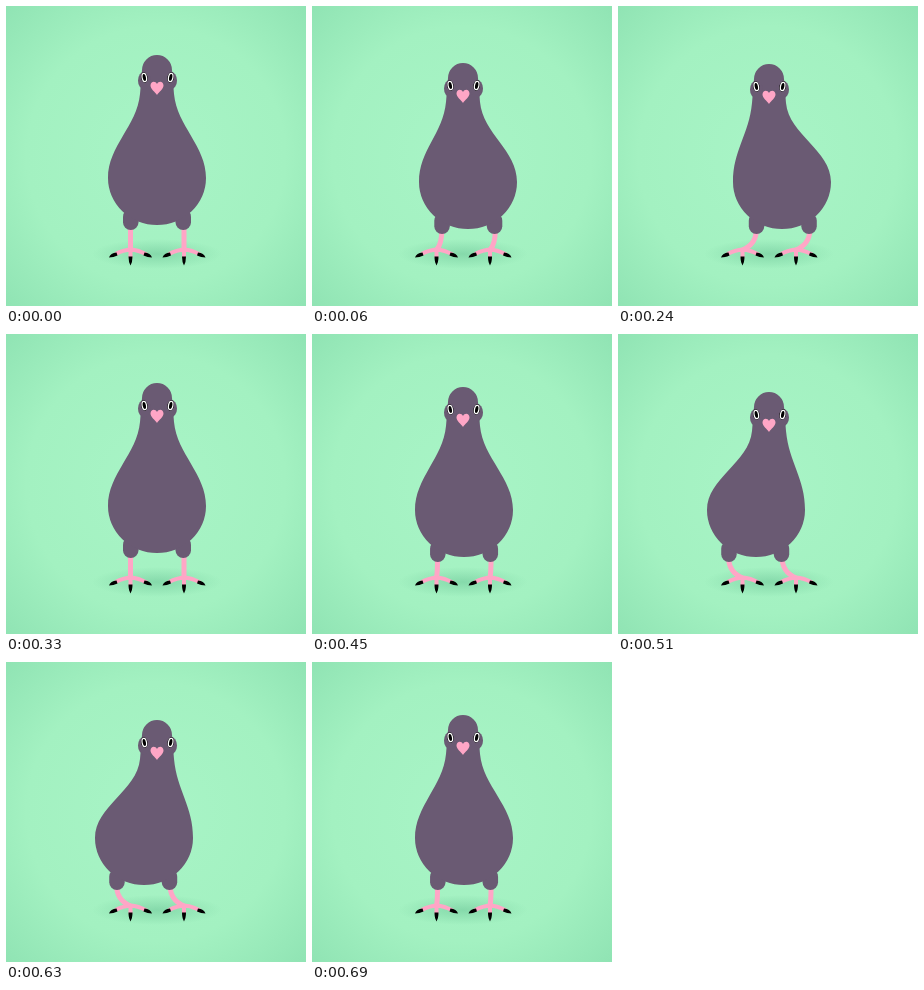
An HTML page for the animation above (0.81 s loop, 300 by 300 pixels).

```html
<!DOCTYPE html>
<html lang="en">
<head>
<meta charset="utf-8">
<title>Swaying pigeon</title>
<style>
  html, body { margin: 0; width: 100%; height: 100%; overflow: hidden; background: #a0efc0; }
  svg { display: block; width: 100vw; height: 100vh; }
  .plumage { fill: #6a5a73; }
  .pink { fill: none; stroke: #ffa6c6; stroke-width: 5; }
</style>
</head>
<body>
<svg viewBox="0 0 300 300">
  <defs>
    <radialGradient id="backdrop" r=".72">
      <stop offset="0" stop-color="#a8f4c6"/>
      <stop offset=".6" stop-color="#a3f1c1"/>
      <stop offset="1" stop-color="#8fe3b3"/>
    </radialGradient>
    <radialGradient id="shade">
      <stop offset="0" stop-color="#71c99b" stop-opacity=".6"/>
      <stop offset="1" stop-color="#71c99b" stop-opacity="0"/>
    </radialGradient>
    <g id="foot">
      <path class="pink" style="stroke-width:4" d="M-15 248Q-7 244 0 243.500Q8 244 16 248.500M0 242V252"/>
      <path d="M-14 246.500Q-20 247 -21.500 251.500Q-17 251.500 -13 249.500ZM14 246.500Q20 247 21.500 251.500Q17 251.500 13 249.500ZM-2 250.500H2Q2 256 0 259.500Q-2 256 -2 250.500Z"/>
    </g>
    <g id="eye">
      <ellipse class="plumage" cy="3" rx="6.300" ry="9"/>
      <g transform="rotate(-10)">
        <ellipse rx="3.300" ry="5.300" fill="#000"/>
        <ellipse rx="2.800" ry="4.800" fill="#fff"/>
        <ellipse rx="1.600" ry="3.500" fill="#000"/>
      </g>
    </g>
  </defs>
  <rect width="300" height="300" fill="url(#backdrop)"/>
  <ellipse cx="151" cy="248" rx="65" ry="15" fill="url(#shade)"/>
  <path id="legs" class="pink"/>
  <use href="#foot" x="124.500"/>
  <use href="#foot" x="178"/>
  <g id="thighs" class="plumage">
    <rect x="117" y="203" width="15.500" height="21" rx="7.700"/>
    <rect x="169.500" y="203" width="15.500" height="21" rx="7.700"/>
  </g>
  <path id="body" class="plumage"/>
  <g id="face">
    <use href="#eye" x="138.300" y="71.500"/>
    <use href="#eye" transform="translate(164.700 71.500) scale(-1 1)"/>
    <path fill="#ffa6c6" d="M151 89c-2-3-6.500-6-6.500-9.500c0-4.500 5-5 6.500-1.500c1.500-3.500 6.500-3 6.500 1.500c0 3.500-4.500 6.500-6.500 9.500z"/>
  </g>
</svg>
<script>
const LOOP = 810;
const find = id => document.getElementById(id);
const [legs, thighs, body, face] = ['legs', 'thighs', 'body', 'face'].map(find);

// Each pose: sideways lean, head drop, body drop.
const rest = [0, 0, 0], dip = [1, 4, 4];
const swing = side => ({ near: [5 * side, 8, 4], far: [13 * side, 9, 4], end: [22.5 * side, 0, 0] });
const right = swing(1), left = swing(-1);

const timeline = [
  [0, rest], [30, dip], [60, right.near], [90, right.far], [120, right.end],
  [240, right.far], [270, right.near], [300, dip], [330, rest],
  [450, dip], [480, left.near], [510, left.far], [540, left.end],
  [630, left.far], [660, left.near], [690, dip]
];

function draw([lean, head, drop]) {
  const side = 172 + drop, shoulder = 140 + drop, neck = 88 + head, chest = 120 + head;
  const l = 102 + lean, r = 200 + lean;
  body.setAttribute('d',
    `M${l} ${side}C${l} ${shoulder} 131 ${chest} 134 ${neck}L136 ${64 + head}` +
    `A15 15 0 0 1 166 ${64 + head}L168 ${neck}` +
    `C171 ${chest} ${r} ${shoulder} ${r} ${side}A49 47 0 0 1 ${l} ${side}Z`);
  face.setAttribute('transform', `translate(0 ${head})`);

  const hip = lean * 1.06;
  thighs.setAttribute('transform', `translate(${hip} ${drop})`);
  legs.setAttribute('d', [124.5, 178].map(x =>
    `M${x + hip} ${220 + drop}Q${x + hip} ${236 + drop / 2} ${x} 244`).join(''));
}

function tick(now) {
  const time = now % LOOP;
  draw(timeline.findLast(([start]) => start <= time)[1]);
  requestAnimationFrame(tick);
}
tick(0);
</script>
</body>
</html>
```
